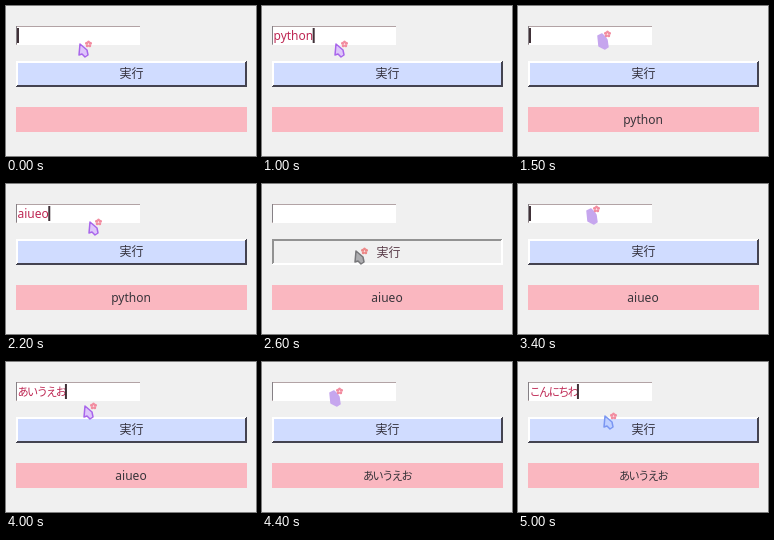
Write an HTML page with a canvas that moves like this. It is 250 px wide and 150 px high and loops after 5.1 s.

```html
<!DOCTYPE html>
<html lang="ja">
<head>
<meta charset="utf-8">
<style>
html, body { margin: 0; width: 100%; height: 100%; overflow: hidden; background: #f0f0f0; }
canvas { display: block; width: 250px; height: 150px; }
</style>
</head>
<body>
<canvas id="stage" width="250" height="150"></canvas>
<script>
const ctx = document.getElementById('stage').getContext('2d');
const LOOP = 5100, STEP = 100;
const LATIN = '12px "Noto Sans", sans-serif';
const KANJI = '12px "Noto Sans CJK JP", "Noto Sans CJK", sans-serif';
const KANA = '11.2px "Noto Sans CJK JP", "Noto Sans CJK", sans-serif';

// Each round types a word, then clears it into the label on submit.
const rounds = [
  { word: 'python', start: 200, submit: 1300 },
  { word: 'aiueo', start: 1700, submit: 2500 },
  { word: 'あいうえお', start: 3600, submit: 4200 },
  { word: 'こんにちわ', start: 4500, submit: Infinity }
];
const presses = [[1200, 1300], [2500, 2700], [4100, 4200]];
const caretGaps = [[1300, 1400], [2500, 3300], [4100, 4500]];
// time, x, y of the pointer
const path = [
  [0, 72, 37], [1000, 72, 37], [1200, 88, 63], [1300, 88, 63],
  [1500, 79, 27], [2100, 79, 27], [2400, 92, 66], [2700, 92, 66],
  [3000, 72, 21], [3400, 68, 24], [3900, 68, 24], [4100, 86, 62],
  [4200, 86, 62], [4400, 67, 28], [4800, 75, 18], [4900, 78, 20], [5000, 85, 53]
];

const within = (spans, t) => spans.some(([a, b]) => t >= a && t < b);

function pointerAt(t) {
  const i = path.findIndex(p => p[0] >= t);
  if (i <= 0) return path[i < 0 ? path.length - 1 : 0].slice(1);
  const [t0, x0, y0] = path[i - 1], [t1, x1, y1] = path[i];
  const k = (t - t0) / (t1 - t0), e = k * k * (3 - 2 * k);
  return [x0 + (x1 - x0) * e, y0 + (y1 - y0) * e];
}

function rect(color, x, y, w, h) {
  ctx.fillStyle = color;
  ctx.fillRect(x, y, w, h);
}

function bevel(x, y, w, h, light, dark, fill) {
  rect(dark, x, y, w, h);
  rect(light, x, y, w - 1, h - 1);
  rect(dark, x + 1, y + 1, w - 2, h - 2);
  rect(light, x + 1, y + 1, w - 3, h - 3);
  rect(fill, x + 2, y + 2, w - 4, h - 4);
}

function text(str, x, y, color, align, font) {
  const kana = /[ぁ-ん]/.test(str);
  ctx.font = font || (kana ? KANA : LATIN);
  ctx.letterSpacing = kana ? '-1.6px' : '0px';
  ctx.textAlign = align;
  ctx.fillStyle = color;
  ctx.fillText(str, x, y);
  return ctx.measureText(str).width;
}

function drawEntry(t, round) {
  rect('#b2a3a5', 10, 20, 124, 19);
  rect('#ffffff', 11, 21, 123, 18);
  rect('#858085', 10, 20, 1, 18);
  const count = Math.max(0, Math.floor((t - round.start) / STEP) + 1);
  const typed = round.word.slice(0, count);
  const width = text(typed, 11.5, 34, '#be2854', 'left');
  if (!within(caretGaps, t)) rect('#403138', typed ? 11 + width : 11, 22, 2, 15);
}

function drawButton(pressed) {
  if (pressed) {
    bevel(10, 55, 231, 26, '#929292', '#ffffff', '#f0f0f0');
    text('実行', 126.5, 73, '#573946', 'center', KANJI);
  } else {
    bevel(10, 55, 231, 26, '#ffffff', '#444350', '#d0dcff');
    text('実行', 125.5, 72, '#33303c', 'center', KANJI);
  }
}

function polygon(points, fill, stroke) {
  ctx.beginPath();
  points.forEach(([x, y]) => ctx.lineTo(x, y));
  ctx.closePath();
  ctx.fillStyle = fill;
  ctx.fill();
  ctx.strokeStyle = stroke;
  ctx.lineWidth = 1.5;
  ctx.lineJoin = 'round';
  ctx.stroke();
}

function drawFlower(x, y, color, turn) {
  ctx.fillStyle = color;
  for (let i = 0; i < 5; i++) {
    const a = turn + i * Math.PI * 0.4;
    ctx.beginPath();
    ctx.arc(x + 2.1 * Math.cos(a), y + 2.1 * Math.sin(a), 1.5, 0, 7);
    ctx.fill();
  }
  rect('#ffd9dc', x - 0.5, y - 0.5, 1, 1);
}

function drawPointer(t, pressed) {
  const [x, y] = pointerAt(t);
  ctx.save();
  ctx.translate(Math.round(x), Math.round(y));
  if (y < 36) {
    polygon([[1, 3], [5, 1], [8, 4], [10, 7], [11, 14], [8, 16], [2, 13]], '#c6a6ee', '#c6a6ee');
  } else {
    const [fill, stroke] = pressed ? ['#adadb0', '#77777a']
      : t >= 4900 ? ['#bfd0ff', '#7a96f2'] : ['#dec6fb', '#a865eb'];
    polygon([[2, 1], [1, 12], [4, 11], [7, 14], [10, 12], [9, 7]], fill, stroke);
  }
  drawFlower(10.5, 1, pressed ? '#ec8888' : '#f28ca0', -Math.PI / 2);
  ctx.restore();
}

function draw(t) {
  const round = rounds.find(r => t < r.submit);
  const shown = rounds.filter(r => t >= r.submit).pop();
  const pressed = within(presses, t);
  rect('#f0f0f0', 0, 0, 250, 150);
  drawEntry(t, round);
  drawButton(pressed);
  rect('#fab7c0', 10, 101, 231, 25);
  if (shown) text(shown.word, 125, 118, '#38343a', 'center');
  drawPointer(t, pressed);
}

const begin = performance.now();
function tick() {
  const t = (performance.now() - begin) % LOOP;
  draw(Math.floor(t / STEP) * STEP);
  requestAnimationFrame(tick);
}
tick();
</script>
</body>
</html>
```
